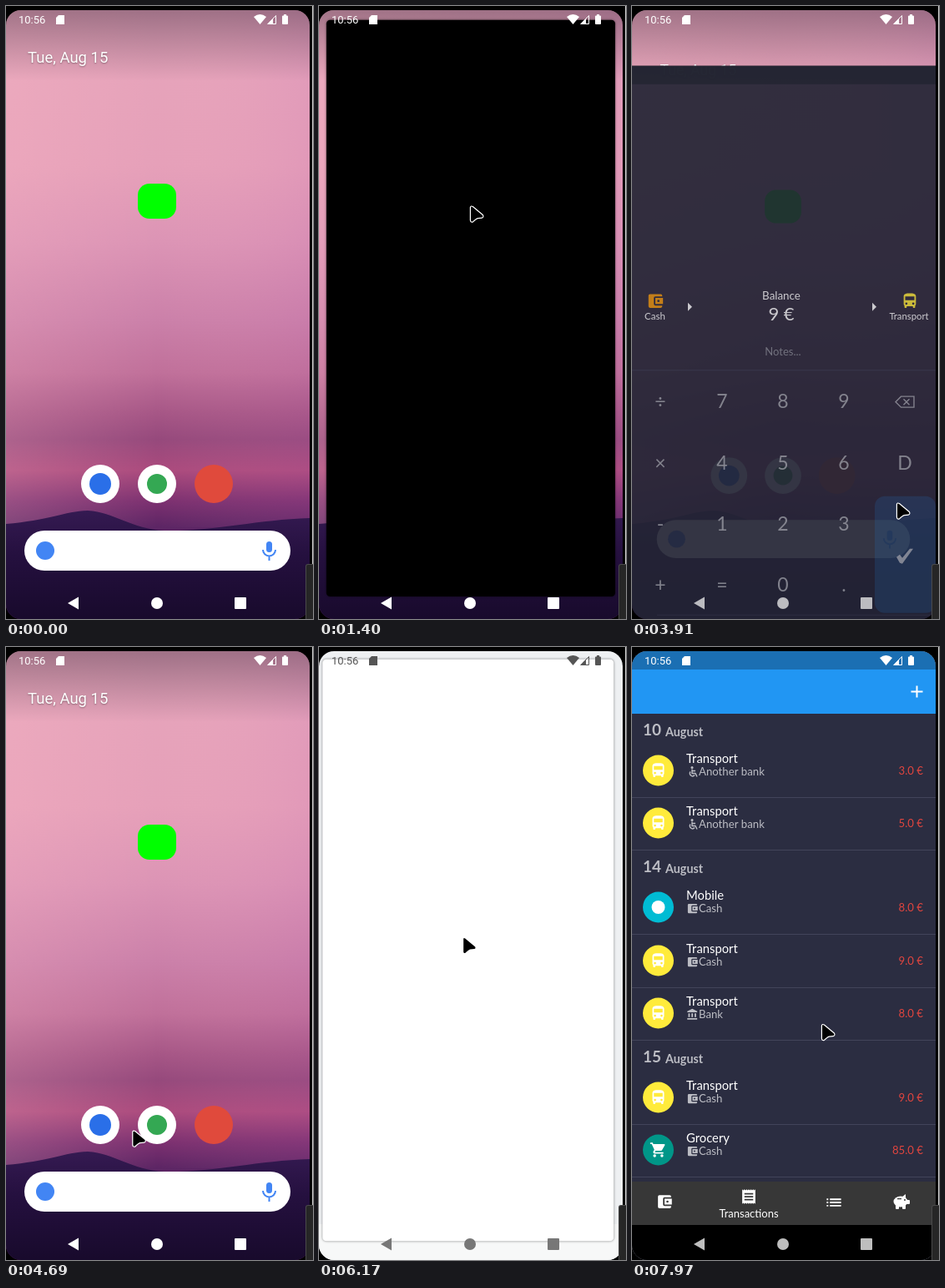
Animation, 368 px wide and 735 px high, one loop 8000 ms. Source, as an HTML page with a canvas:

```html
<!DOCTYPE html>
<html lang="en">
<head>
<meta charset="utf-8">
<title>Pocket ledger demo</title>
<style>
html, body { margin: 0; width: 100%; height: 100%; overflow: hidden; background: #000; }
canvas { display: block; width: 368px; height: 735px; }
</style>
</head>
<body>
<canvas id="stage" width="368" height="735"></canvas>
<script>
const c = document.getElementById('stage').getContext('2d');
const LOOP = 8000, W = 364, TOP = 5, BOTTOM = 735;
const LATO = 'Lato, sans-serif', ROBOTO = 'Roboto, sans-serif';
const WHITE = '#fff', INK = '#2b2d41', BLUE = '#4285f4';

// Glyphs on a 24 unit grid
const GLYPHS = {
  bus: 'M4 16c0 .9.4 1.7 1 2.2V20q0 1 1 1h1q1 0 1-1v-1h8v1q0 1 1 1h1q1 0 1-1v-1.8c.6-.5 1-1.3 1-2.2V6c0-3.5-3.6-4-8-4s-8 .5-8 4zM6 6h12v5H6zM6 15.5a1.5 1.5 0 1 0 3 0a1.5 1.5 0 1 0-3 0zM15 15.5a1.5 1.5 0 1 0 3 0a1.5 1.5 0 1 0-3 0z',
  wallet: 'M21 18v1q0 2-2 2H5q-2 0-2-2V5q0-2 2-2h14q2 0 2 2v1h-9q-2 0-2 2v8q0 2 2 2zM12 8h10v8H12zM14.5 12a1.5 1.5 0 1 0 3 0a1.5 1.5 0 1 0-3 0z',
  bank: 'M4 10h3v7H4zM10 10h3v7h-3zM16 10h3v7h-3zM2 19h19v3H2zM11.5 1L2 6v2h19V6z',
  cart: 'M5 20a2 2 0 1 0 4 0a2 2 0 1 0-4 0zM15 20a2 2 0 1 0 4 0a2 2 0 1 0-4 0zM1 2v2h2l3.6 7.6L5.2 14c-.8 1.400.3 3 1.800 3h12v-2H7.400l.8-2h7.400q1.200 0 1.700-1L21 5.500Q21.400 4 20 4H5.200L4.300 2z',
  list: 'M3 7h2v2H3zM3 11h2v2H3zM3 15h2v2H3zM7 7h14v2H7zM7 11h14v2H7zM7 15h14v2H7z',
  receipt: 'M3 2' + 'l1.5 1.5L'.slice(0, 0) + 'l1.5 1.5l1.5-1.5'.repeat(6) + 'v20' + 'l-1.5-1.5l-1.5 1.5'.repeat(6) + 'zM6 7h12v2H6zM6 11h12v2H6zM6 15h12v2H6z',
  phone: 'M6.6 10.8c1.4 2.8 3.8 5.1 6.600 6.600l2.200-2.200q.5-.5 1-.2 1.600.5 3.600.6 1 0 1 1V20q0 1-1 1C10.600 21 3 13.400 3 4q0-1 1-1h3.500q1 0 1 1 0 2 .6 3.600.2.500-.3 1z'
};
for (const name in GLYPHS) GLYPHS[name] = new Path2D(GLYPHS[name]);

const clamp = v => Math.max(0, Math.min(1, v));
const lerp = (a, b, p) => a + (b - a) * p;
const ramp = (t, from, to) => clamp((t - from) / (to - from));
const smooth = p => p * p * (3 - 2 * p);
const easeOut = p => 1 - (1 - p) ** 3;

function box(x, y, w, h, fill, r = 0) {
  c.fillStyle = fill;
  c.beginPath();
  c.roundRect(x, y, w, h, r);
  c.fill();
}
function disc(x, y, r, fill) {
  c.fillStyle = fill;
  c.beginPath();
  c.arc(x, y, r, 0, 7);
  c.fill();
}
function poly(points, fill) {
  c.fillStyle = fill;
  c.beginPath();
  points.forEach(([x, y]) => c.lineTo(x, y));
  c.closePath();
  c.fill();
}
function line(d, color, width) {
  c.strokeStyle = color;
  c.lineWidth = width;
  c.stroke(new Path2D(d));
}
function text(s, x, y, size, color, family = LATO, align = 'left', weight = 400) {
  c.font = `${weight} ${size}px ${family}`;
  c.textAlign = align;
  c.fillStyle = color;
  c.fillText(s, x, y);
}
function glyph(name, x, y, size, color) {
  c.save();
  c.translate(x - size / 2, y - size / 2);
  c.scale(size / 24, size / 24);
  c.fillStyle = color;
  c.fill(GLYPHS[name], 'evenodd');
  c.restore();
}
function layer(alpha, draw, dy = 0) {
  c.save();
  c.globalAlpha *= alpha;
  c.translate(0, dy);
  draw();
  c.restore();
}
function gradient(y0, y1, stops) {
  const g = c.createLinearGradient(0, y0, 0, y1);
  stops.forEach(([at, color]) => g.addColorStop(at, color));
  return g;
}

function wallpaper() {
  box(0, TOP, W, 730, gradient(5, 625, [
    [0, '#e6a5bb'], [.3, '#e6a0b9'], [.45, '#dc94b5'], [.6, '#cb80a9'],
    [.7, '#c0709a'], [.78, '#a65686'], [.83, '#96497c'], [.89, '#ab4a7d'],
    [.95, '#7c3070'], [1, '#5c2564']]));
  const side = c.createLinearGradient(0, 0, W, 0);
  side.addColorStop(0, 'rgba(255,190,200,.22)');
  side.addColorStop(.5, 'rgba(255,190,200,0)');
  side.addColorStop(1, 'rgba(190,100,180,.12)');
  box(0, TOP, W, 620, side);
  c.fillStyle = gradient(605, 735, [[0, '#351a52'], [.4, '#25103f'], [1, '#180a2c']]);
  c.beginPath();
  c.moveTo(0, 621);
  c.bezierCurveTo(50, 617, 70, 606, 98, 605);
  c.bezierCurveTo(130, 607, 150, 627, 190, 629);
  c.bezierCurveTo(250, 630, 300, 616, 364, 614);
  c.lineTo(364, 735);
  c.lineTo(0, 735);
  c.fill();
  box(0, TOP, W, 85, gradient(5, 90, [[0, 'rgba(60,40,60,.42)'], [1, 'rgba(60,40,60,0)']]));
}

function home(alpha = 1, scale = 1) {
  layer(alpha, () => {
    c.translate(181, 368);
    c.scale(scale, scale);
    c.translate(-181, -368);
    c.shadowColor = 'rgba(0,0,0,.35)';
    c.shadowBlur = 2;
    c.shadowOffsetY = 1;
    text('Tue, Aug 15', 26, 68, 18.5, WHITE, ROBOTO);
    c.shadowColor = 'transparent';
    box(158, 213, 46, 42, '#0f0', 14);
    [113, 181].forEach(x => disc(x, 573, 23, WHITE));
    disc(113, 573, 13, '#2a6fe8');
    disc(181, 573, 12, '#34a853');
    disc(249, 573, 23, '#e04a3c');
    box(22, 629, 319, 48, WHITE, 24);
    disc(47, 653, 11, BLUE);
    box(312, 642, 7, 13, BLUE, 3.5);
    line('M308 652a7.5 7.5 0 0 0 15 0M315.5 660v5', BLUE, 2);
  });
}

function calculator(t) {
  box(0, TOP, W, 730, INK);
  box(0, TOP, W, 22, '#20232f');
  const press = (x, y, w, h, from, to) => {
    const p = ramp(t, from, from + 250);
    if (!p || t > to) return;
    c.save();
    c.beginPath();
    c.roundRect(x, y, w, h, 12);
    c.clip();
    disc(x + w / 2, y + h / 2, lerp(10, h * .62, p), 'rgba(33,120,200,.25)');
    c.restore();
  };
  press(218, 371, 73, 73, 2800, 3150);
  press(291, 521, 73, 140, 3590, 4300);
  glyph('wallet', 28, 287, 22, '#f59a0c');
  text('Cash', 27.5, 309, 11.5, WHITE, LATO, 'center');
  glyph('bus', 333, 287, 22, '#ffeb3b');
  text('Transport', 332, 309, 11.3, WHITE, LATO, 'center');
  [67, 288].forEach(x => poly([[x, 289], [x, 299], [x + 5, 294]], WHITE));
  text('Balance', 179, 285, 13.4, WHITE, LATO, 'center');
  text(t < 2960 ? '0.0 €' : '9 €', 179, 310.5, 22, WHITE, LATO, 'center');
  text('Notes...', 181, 352, 13, '#8a8b96', LATO, 'center');
  box(0, 369.5, W, 1, '#3b3d51');
  ['÷789', '×456D', '-123', '+=0.'].forEach((row, r) => [...row].forEach((key, i) =>
    text(key, [34, 108, 181, 254, 327][i], 415.5 + r * 73.4, 23, '#a0a1aa', LATO, 'center')));
  line('M322.500 401.500H338V414.500H322.500L316 408zM325.500 404.500l7 7m0-7l-7 7', '#a0a1aa', 1.4);
  poly([[317, 594], [321, 591], [324, 595], [333, 584], [337, 584], [324, 602], [321, 601]], '#a0a1aa');
  box(30, 663, 334, 1, '#303247');
  const sec = 4 + Math.floor((t - 1000) / 1000);
  text(`August 15, 2023 10:56:0${sec} AM`, 180.5, 684, 13, WHITE, LATO, 'center');
}

// White-plate apps carry a mark size and colour; the others draw a pictogram
const APPS = [
  ['Calendar', 13, BLUE], ['Camera', camera], ['Bronda', 23, '#e04a3c'], ['Clock', clock], ['Contacts', contacts],
  ['Stash', 12, '#34a853'], ['fb', 12, '#47c5fb'], ['Files', folder], ['Letro', 12, '#ea4335'], ['Quillo', 14, BLUE],
  ['Maps', 12, '#34a853'], ['Messages', 14, '#2a6fe8'], ['Phone', phone], ['Photos', 13, '#fbbc04'], ['Tovi Shelf', 12, '#34a853'],
  ['Settings', gear], ['Kassely', 12, '#f5c443'], ['PaneLen...', 12, '#94b63a'], ['Vidolune', 14, '#f00'], ['VL Music', 16, '#f00']
];
function camera(x, y) {
  disc(x, y, 23, BLUE);
  box(x - 6, y - 13, 12, 8, WHITE, 3);
  box(x - 14, y - 9, 28, 20, WHITE, 3);
  disc(x, y + 1, 6, BLUE);
}
function clock(x, y) {
  disc(x, y, 23, '#cfd6dc');
  disc(x, y, 20, BLUE);
  line(`M${x} ${y}l-7-17`, WHITE, 2.5);
  disc(x, y, 2, WHITE);
}
function contacts(x, y) {
  disc(x, y, 23, WHITE);
  box(x - 13, y - 13, 26, 26, '#0b6fb8', 2);
  box(x - 13, y - 9, 26, 18, '#29a9e6', 1);
  disc(x, y - 3, 3.5, WHITE);
  box(x - 6, y + 2, 12, 5, WHITE, 3);
}
function folder(x, y) {
  disc(x, y, 23, BLUE);
  box(x - 13, y - 11, 13, 10, WHITE, 2);
  box(x - 13, y - 8, 26, 19, WHITE, 2);
}
function phone(x, y) {
  disc(x, y, 23, WHITE);
  glyph('phone', x, y, 34, '#1a9be8');
}
function gear(x, y) {
  disc(x, y, 23, BLUE);
  c.strokeStyle = WHITE;
  for (const [r, w, dash] of [[9, 6, []], [12.5, 5, [5, 4.82]]]) {
    c.lineWidth = w;
    c.setLineDash(dash);
    c.beginPath();
    c.arc(x, y, r, 0, Math.PI * 2);
    c.stroke();
  }
  c.setLineDash([]);
}

function drawer(p) {
  layer(smooth(p), () => {
    box(0, TOP, W, 730, '#eef0f2');
    box(0, 692, W, 43, '#f7f8f8');
  });
  layer(ramp(p, .1, .8), () => {
    box(11, 38, 340, 46, '#dde4e7', 23);
    text('Search your phone and more', 25, 69, 18.7, '#666e72', ROBOTO);
    [56, 62, 68].forEach(y => disc(327, y, 1.9, '#111'));
    APPS.forEach(([name, mark, color], i) => {
      const x = 44.5 + (i % 5) * 68.2, y = 132 + Math.floor(i / 5) * 101;
      if (typeof mark === 'function') mark(x, y);
      else {
        disc(x, y, 23, WHITE);
        disc(x, y, mark, color);
      }
      text(name, x, y + 44, 11.4, '#333', ROBOTO, 'center');
    });
  }, 420 * (1 - p));
}

function wheelchair(x, y, color) {
  disc(x - 1, y - 5, 1.5, color);
  line(`M${x - 1} ${y - 3}v5h4l2 4M${x - 1} ${y - 1}h4M${x - 3} ${y}a3 3 0 1 0 5 4`, color, 1.4);
}
function piggy(x, y) {
  c.fillStyle = WHITE;
  c.beginPath();
  c.ellipse(x - 1, y, 8.500, 6.500, 0, 0, 7);
  c.fill();
  box(x - 7, y + 2, 4, 7, WHITE, 1);
  box(x + 1, y + 2, 4, 7, WHITE, 1);
  box(x + 5, y - 2, 5, 5, WHITE, 1);
  poly([[x, y - 5], [x + 5, y - 9], [x + 5, y - 2]], WHITE);
  disc(x + 4, y - 2, 1, '#373737');
  box(x - 5, y - 4, 5, 1.3, '#373737');
}

const DAYS = [[101, 10], [265, 14], [493, 15]];
const ROWS = [
  [148, 'Transport', 'Another bank', '3.0'], [211, 'Transport', 'Another bank', '5.0'],
  [312, 'Mobile', 'Cash', '8.0'], [376, 'Transport', 'Cash', '9.0'], [439, 'Transport', 'Bank', '8.0'],
  [540, 'Transport', 'Cash', '9.0'], [603, 'Grocery', 'Cash', '85.0']
];
const SWATCH = { Transport: '#ffeb3b', Mobile: '#00bcd4', Grocery: '#009688' };

function transactions(squeeze, family) {
  const at = y => y + (312 - y) * .031 * squeeze;
  const dim = '#bcbdc4';
  box(0, at(TOP), W, 735, INK);
  box(0, at(TOP), W, 23, '#1b6fb3');
  box(0, at(27), W, 53, '#2196f3');
  line(`M334.500 ${at(53.5)}h14M341.500 ${at(53.5) - 7}v14`, WHITE, 2);
  for (const [y, day] of DAYS) {
    text(day, 13, at(y) + 5, 19, dim, family, 'left', 700);
    text('August', 40, at(y) + 5.5, 14.3, dim, family, 'left', 700);
  }
  for (const [y0, name, account, sum] of ROWS) {
    const y = at(y0);
    disc(31.5, y, 18.5, SWATCH[name]);
    if (name === 'Mobile') disc(31.5, y, 8, WHITE);
    else glyph(name === 'Grocery' ? 'cart' : 'bus', 31.5, y, 21, WHITE);
    text(name, 65, y - 9.5, 14.8, WHITE, family);
    if (account === 'Another bank') wheelchair(73, y + 1.5, dim);
    else glyph(account === 'Bank' ? 'bank' : 'wallet', 72.5, y + 1.5, 15, dim);
    text(account, 80, y + 6, 13.2, dim, family);
    text(sum + ' €', 349, y + 5, 13.2, '#e0453f', family, 'right');
    box(0, at(y0 + 32), W, 1, '#42445a');
  }
  box(0, 641, W, 52, '#373737');
  glyph('wallet', 39, 665, 21, WHITE);
  glyph('receipt', 140, 659, 21, WHITE);
  text('Transactions', 140, 684, 13, WHITE, family, 'center');
  glyph('list', 242, 666, 23, WHITE);
  piggy(323, 665);
  box(0, 693, W, 42, '#000');
}

function statusBar(color) {
  text('10:56', 15, 21, 13, color, ROBOTO);
  poly([[63, 11], [70, 11], [70, 22], [60, 22], [60, 14]], color);
  c.beginPath();
  c.moveTo(304.5, 22);
  c.lineTo(297, 13);
  c.quadraticCurveTo(304.5, 7, 312, 13);
  c.fill();
  line('M314 21.500L323.500 11.500V21.500z', color, 1);
  poly([[313, 22], [320, 15], [320, 22]], color);
  box(331, 11.500, 7, 10.500, color, 1);
  box(333, 10, 3, 2, color);
}
function navBar(color) {
  poly([[74, 716], [87, 708.5], [87, 723.5]], color);
  disc(181, 716, 7, color);
  box(274, 709, 14, 14, color, 1);
}

function growingWindow(p, x, y, w, h, fill) {
  const left = lerp(x, 0, p), top = lerp(y, TOP, p);
  c.shadowColor = 'rgba(0,0,0,.5)';
  c.shadowBlur = 3;
  box(left, top, lerp(x + w, W, p) - left, lerp(y + h, BOTTOM, p) - top, fill, lerp(14, 4, p));
  c.shadowColor = 'transparent';
}

const CURSOR_PATH = [
  [420, 62, 330], [650, 206, 262], [830, 182, 240], [1920, 182, 240], [2340, 323, 387],
  [2720, 261, 410], [3120, 261, 410], [3580, 318, 596], [4370, 318, 596], [4700, 152, 580],
  [5170, 144, 308], [5330, 144, 308], [5700, 114, 236], [5930, 114, 236], [6400, 228, 452.5], [8000, 228, 452.5]
];
function cursor(t) {
  const next = CURSOR_PATH.findIndex(k => k[0] > t);
  if (next < 1) return;
  const [t0, x0, y0] = CURSOR_PATH[next - 1], [t1, x1, y1] = CURSOR_PATH[next];
  const p = smooth(ramp(t, t0, t1));
  c.save();
  c.translate(lerp(x0, x1, p), lerp(y0, y1, p));
  const shape = new Path2D('M0 1.500Q.2 0 2 1L14 11Q15 13 13 13.500L8 14Q6 14.500 2 18.500Q.2 19 0 17z');
  c.lineJoin = 'round';
  c.strokeStyle = WHITE;
  c.lineWidth = 2.4;
  c.stroke(shape);
  c.fillStyle = '#000';
  c.fill(shape);
  c.restore();
}

function screen(t) {
  let status = WHITE, nav = WHITE;
  if (t < 1620) {
    const p = easeOut(ramp(t, 1180, 1538));
    wallpaper();
    home(1 - clamp(p * 1.1));
    if (p) growingWindow(p, 158, 213, 46, 42, '#000');
    layer(ramp(t, 1490, 1620), () => calculator(t));
  } else if (t < 3820) {
    calculator(t);
    box(0, 693, W, 42, '#000');
    if (t > 1940) nav = '#cacaca';
  } else if (t < 5890) {
    const p = ramp(t, 3810, 4210), open = smooth(ramp(t, 4700, 5180));
    wallpaper();
    home(1 - clamp(open * 2), 1 - .065 * (1 - p));
    if (p < 1) {
      const dy = 264 * p;
      layer(.93 * (1 - p), () => box(0, TOP + dy, W, 730, '#000'));
      layer(1 - p, () => calculator(t), dy);
      nav = '#bcbcc0';
    }
    if (open) drawer(open);
    if (open > .5) status = nav = '#777';
  } else if (t < 7400) {
    const p = easeOut(ramp(t, 5890, 6330));
    drawer(1);
    growingWindow(p, 90, 209, 46, 46, WHITE);
    status = p > .9 ? '#555' : '#777';
    nav = t < 7270 ? '#777' : '#888';
  } else {
    const veil = 1 - ramp(t, 7400, 7750), r = 4 * (t - 7400) + 1;
    box(0, TOP, W, 730, WHITE);
    transactions(veil, t < 7740 ? ROBOTO : LATO);
    layer(veil, () => box(0, TOP, W, 730, WHITE));
    const g = c.createRadialGradient(181, 0, r * .76, 181, 0, r);
    g.addColorStop(0, 'rgba(255,255,255,0)');
    g.addColorStop(1, WHITE);
    box(0, TOP, W, 730, g);
    status = t < 7640 ? '#444' : WHITE;
    nav = t < 7640 ? '#888' : '#bebebe';
  }
  statusBar(status);
  navBar(nav);
}

function frame(now) {
  const t = now % LOOP;
  box(0, 0, 368, 735, '#000');
  box(367, 0, 1, 735, '#d0d0d0');
  c.save();
  c.beginPath();
  c.roundRect(0, TOP, W, 730, 18);
  c.clip();
  screen(t);
  cursor(t);
  c.restore();
  box(359, 669, 12, 70, '#4a4a4a', 3);
  box(360, 670, 12, 70, '#262626', 2);
  requestAnimationFrame(frame);
}
requestAnimationFrame(frame);
</script>
</body>
</html>
```
